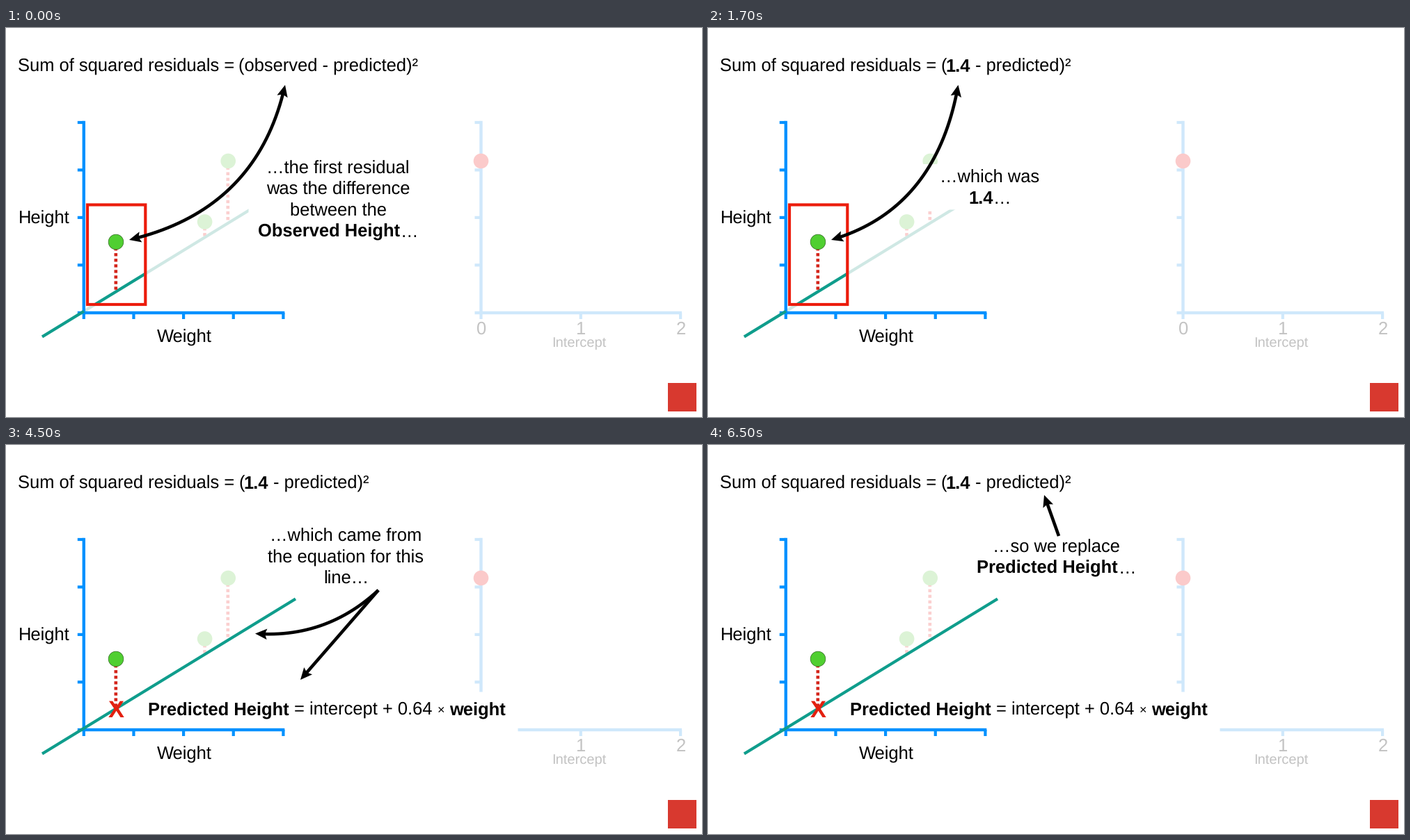
Recreate the animation shown at these times as a matplotlib script. Size 1000 px wide and 560 px high, loop 8 s.

```python
import numpy as np
import matplotlib.pyplot as plt
from matplotlib.animation import FuncAnimation
from matplotlib.patches import Circle, Polygon, Rectangle

plt.rcParams["font.family"] = "Liberation Sans"
plt.rcParams["text.hinting"] = "none"
plt.rcParams["path.snap"] = False

W, H, DPI = 1000, 560, 100
PT = 72 / DPI
SIZE = 25.5
STEP = 500
STARTS = [0, 500, 2500, 4500, 6500]
FRAMES = 8000 // STEP

BLUE, PALE_BLUE = "#0091ff", "#cfe8fb"
TEAL, PALE_TEAL = "#0f9d8c", "#cfe8e4"
GREEN, PALE_GREEN = "#50cf31", "#dcf3d6"
RED, DOT_RED, PALE_RED = "#ec1c0c", "#d4241a", "#fbcfcf"
GREY = "#c3c3c3"

fig = plt.figure(figsize=(W / DPI, H / DPI), dpi=DPI, facecolor="white")
ax = fig.add_axes([0, 0, 1, 1])
ax.set_xlim(0, W)
ax.set_ylim(H, 0)
ax.axis("off")

ALL = (0, 1, 2, 3, 4)
staged = []


def keep(artist, scenes):
    staged.append((artist, scenes))
    return artist


def line(xs, ys, color, width, z, scenes=ALL, **kw):
    art, = ax.plot(xs, ys, color=color, lw=width * PT, zorder=z,
                   solid_capstyle="butt", **kw)
    keep(art, scenes)


def rect(x0, y0, x1, y1, z, scenes=ALL, **kw):
    keep(ax.add_patch(Rectangle((x0, y0), x1 - x0, y1 - y0, zorder=z, **kw)), scenes)


def cover(x0, y0, x1, y1, scenes, z=6):
    rect(x0, y0, x1, y1, z, scenes, fc="white", ec="none")


def dot(x, y, color, z, edge="none"):
    keep(ax.add_patch(Circle((x, y), 10.8, fc=color, ec=edge, lw=0.6, zorder=z)), ALL)


def text(x, y, s, scenes=ALL, size=SIZE, bold=False, ha="left", color="black", z=9):
    return keep(ax.text(x, y, s, fontsize=size * PT, color=color, ha=ha, va="baseline",
                        weight="bold" if bold else "normal", zorder=z), scenes)


def caption(x, y, rows, scene):
    """Centred rows; a leading * marks a bold one, its ellipsis stays regular."""
    for row in rows:
        words = row.lstrip("*")
        if row[0] == "*" and row[-1] == "…":
            art = text(x - SIZE / 2, y, words[:-1], (scene,), bold=True, ha="center")
            keep(ax.annotate("…", (1, y), xycoords=(art, "data"), fontsize=SIZE * PT,
                             va="baseline", zorder=9), (scene,))
        else:
            text(x, y, words, (scene,), bold=row[0] == "*", ha="center")
        y += 30.2


def dotted(x, y0, y1, color, z):
    line([x, x], [y0, y1], color, 4.6, z, linestyle=(0, (0.95, 0.8)))


def head(tip, near, scene):
    d = (tip - near) / np.hypot(*(tip - near))
    n = np.array([-d[1], d[0]])
    back = tip - 17 * d
    pts = [tip, back + 7.8 * n, tip - 14 * d, back - 7.8 * n]
    keep(ax.add_patch(Polygon(pts, fc="black", ec="none", zorder=8)), (scene,))


def arrow(p0, ctrl, p1, scene, both=False):
    """Quadratic curve with a head at p1, and at p0 too if both."""
    p0, ctrl, p1 = (np.array(p, float) for p in (p0, ctrl, p1))
    t = np.linspace(0, 1, 200)[:, None]
    pts = (1 - t) ** 2 * p0 + 2 * t * (1 - t) * ctrl + t ** 2 * p1

    def clear(tip):
        return np.hypot(*(pts - tip).T) > 12

    shaft = pts[clear(p1) & (clear(p0) if both else True)]
    line(shaft[:, 0], shaft[:, 1], "black", 4.6, 8, (scene,))
    head(p1, shaft[-1], scene)
    if both:
        head(p0, shaft[0], scene)


def axes(x, color, z):
    line([x, x], [133.8, 412], color, 4.4, z)
    line([x - 9, x + 288.5], [410, 410], color, 4.4, z)
    for y in np.linspace(136, 341.3, 4):
        line([x - 9, x], [y, y], color, 4.2, z)


def x_ticks(x, count, color, z):
    for tx in np.linspace(x, x + 286.6, count):
        line([tx, tx], [410, 419], color, 4.2, z)


def fit_y(x):
    return 444.5 - 0.6126 * (x - 52)


def fit(x0, x1, color, z, scenes):
    line([x0, x1], [fit_y(x0), fit_y(x1)], color, 4.2, z, scenes)


# Right graph, faded
axes(682.5, PALE_BLUE, 1)
x_ticks(682.5, 3, PALE_BLUE, 1)
dot(682.5, 191.5, "#fbcaca", 2)
for x, s in ((683, "0"), (825.5, "1"), (969.5, "2")):
    text(x, 441, s, ha="center", color=GREY, z=2)
text(823, 459, "Intercept", size=20.2, ha="center", color=GREY, z=2)
cover(655, 355.5, 735.5, 447, (3, 4), z=3)

# Left graph
fit(52, 416, PALE_TEAL, 4, (0, 1, 2))
fit(52, 112, TEAL, 5, (0, 1, 2))
fit((fit_y(0) - 398) / 0.6126, 200, TEAL, 5, (0, 1, 2))
fit(52, 416, TEAL, 5, (3, 4))
dotted(318.8, 191.5, 277, PALE_RED, 3)
dotted(285.5, 279, 299.5, PALE_RED, 3)
dot(319.2, 191.5, PALE_GREEN, 4)
dot(285.6, 279, PALE_GREEN, 4)
axes(111.8, BLUE, 4.5)
x_ticks(111.8, 5, BLUE, 4.5)
dotted(157.8, 308, 379, DOT_RED, 6)
dot(158, 308, GREEN, 7, "#3c7a2c")
rect(117, 254.5, 200.3, 398, 7, (0, 1, 2), fill=False, ec=RED, lw=4.2 * PT)
text(158, 392.5, "X", (2, 3, 4), size=34.5, bold=True, ha="center", color="#e3200f")
text(18, 282, "Height")
text(217, 453, "Weight")

# Formula at the top
text(17, 63, "Sum of squared residuals =")
text(334.3, 63, "(observed - predicted)²", (0,))
later = (1, 2, 3, 4)
text(334.3, 63, "(", later)
text(341.8, 63, "1.4", later, bold=True)
text(384, 63, "- predicted)²", later)

# Notes with their covers and arrows
cover(348.5, 183, 606, 313, (0,))
caption(477, 210, ["…the first residual", "was the difference",
                   "between the", "*Observed Height…"], 0)
arrow((177, 305), (361, 262), (401, 82), 0, both=True)

cover(308, 196, 498, 261.5, (1,))
caption(405, 222.5, ["…which was", "*1.4…"], 1)
arrow((177, 305), (328, 261), (359.5, 82), 1, both=True)

cover(388, 203, 535, 303, (2,))
caption(461.5, 230.5, ["…and the", "*Predicted", "*Height…"], 2)
arrow((185, 377), (402, 307), (457.5, 72), 2, both=True)

caption(488.5, 139, ["…which came from", "the equation for this", "line…"], 3)
arrow((535, 209), (460, 279), (358, 271.5), 3)
arrow((535, 209), (479, 273.5), (423, 338), 3)

caption(500.5, 154.5, ["…so we replace", "*Predicted Height…"], 4)
arrow((504, 131), (493.5, 101.5), (483, 72), 4)

eq = (3, 4)
text(204, 389, "Predicted Height", eq, bold=True)
text(413.5, 389, "= intercept + 0.64", eq)
text(625.3, 387, "×", eq, size=18, ha="center")
text(637, 389, "weight", eq, bold=True)

# Corner badge
rect(951, 511, 992, 552, 2, fc="#d8392f", ec="none")


def update(i):
    scene = sum(i * STEP >= s for s in STARTS) - 1
    for art, scenes in staged:
        art.set_visible(scene in scenes)
    return [art for art, _ in staged]


anim = FuncAnimation(fig, update, frames=FRAMES, interval=STEP,
                     repeat=True, repeat_delay=0, blit=False)
plt.show()
```
